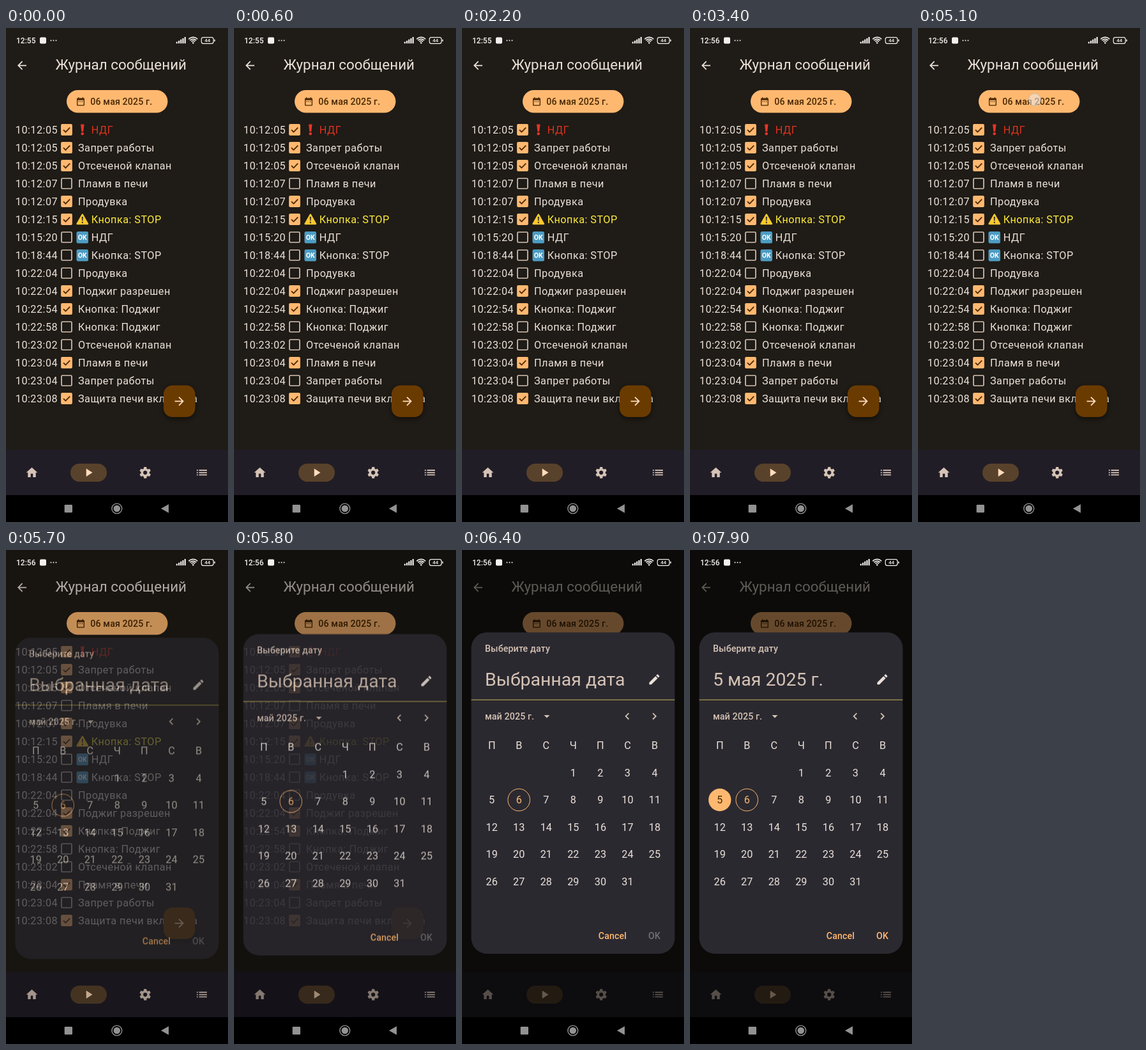
An HTML page with a canvas for the animation above (8 s loop, 348x772 px).

```html
<!DOCTYPE html>
<html lang="ru">
<head>
<meta charset="utf-8">
<title>Журнал сообщений</title>
<style>
html, body { margin: 0; width: 100%; height: 100%; overflow: hidden; background: #1f1b16; }
canvas { display: block; width: 348px; height: 772px; }
</style>
</head>
<body>
<canvas id="stage"></canvas>
<script>
const W = 348, H = 772, LOOP = 8000;
const BG = '#1f1b16', TEXT = '#ebe1d9', SOFT = '#d5c3b5', ACCENT = '#ffb870', DARK = '#4a2800';
const dpr = window.devicePixelRatio || 1;

function prepare(canvas) {
  canvas.width = W * dpr;
  canvas.height = H * dpr;
  const c = canvas.getContext('2d');
  c.scale(dpr, dpr);
  return c;
}
const screen2d = prepare(document.getElementById('stage'));
const sheet2d = prepare(document.createElement('canvas'));
let ctx = screen2d; // current drawing layer

const ICONS = {
  home: 'M10 20v-6h4v6h5v-8h3L12 3 2 12h3v8z',
  play: 'M8 5v14l11-7z',
  list: 'M3 13h2v-2H3zm0 4h2v-2H3zm0-8h2V7H3zm4 4h14v-2H7zm0 4h14v-2H7zM7 7v2h14V7z',
  back: 'M20 11H7.83l5.59-5.59L12 4l-8 8 8 8 1.41-1.41L7.83 13H20z',
  next: 'M12 4l-1.41 1.41L16.17 11H4v2h12.17l-5.58 5.59L12 20l8-8z',
  date: 'M9 11H7v2h2zm4 0h-2v2h2zm4 0h-2v2h2zm2-7h-1V2h-2v2H8V2H6v2H5c-1.1 0-2 .9-2 2v14c0 1.1.9 2 2 2h14c1.1 0 2-.9 2-2V6c0-1.1-.9-2-2-2zm0 16H5V9h14z',
  edit: 'M3 17.25V21h3.75L17.81 9.94l-3.75-3.75zM20.71 7.04c.39-.39.39-1.02 0-1.41l-2.34-2.34c-.39-.39-1.02-.39-1.41 0l-1.83 1.83 3.75 3.75z',
  left: 'M15.41 7.41L14 6l-6 6 6 6 1.41-1.41L10.83 12z',
  right: 'M10 6L8.59 7.41 13.17 12l-4.58 4.59L10 18l6-6z',
  drop: 'M7 10l5 5 5-5z'
};
for (const k in ICONS) ICONS[k] = new Path2D(ICONS[k]);

// time, checked, text, kind
const LOG = [
  ['10:12:05', 1, 'НДГ', 'alarm'],
  ['10:12:05', 1, 'Запрет работы'],
  ['10:12:05', 1, 'Отсеченой клапан'],
  ['10:12:07', 0, 'Пламя в печи'],
  ['10:12:07', 1, 'Продувка'],
  ['10:12:15', 1, 'Кнопка: STOP', 'warn'],
  ['10:15:20', 0, 'НДГ', 'ok'],
  ['10:18:44', 0, 'Кнопка: STOP', 'ok'],
  ['10:22:04', 0, 'Продувка'],
  ['10:22:04', 1, 'Поджиг разрешен'],
  ['10:22:54', 1, 'Кнопка: Поджиг'],
  ['10:22:58', 0, 'Кнопка: Поджиг'],
  ['10:23:02', 0, 'Отсеченой клапан'],
  ['10:23:04', 1, 'Пламя в печи'],
  ['10:23:04', 0, 'Запрет работы'],
  ['10:23:08', 1, 'Защита печи включена']
];
const KIND_COLOR = { alarm: '#e0321f', warn: '#fdec3c' };

const clamp = v => Math.max(0, Math.min(1, v));
const ramp = (t, a, b) => clamp((t - a) / (b - a));

function label(s, x, y, size, color, { weight = 400, gap = 0, align = 'left' } = {}) {
  ctx.font = `${weight} ${size}px Roboto, sans-serif`;
  ctx.letterSpacing = gap + 'px';
  ctx.textAlign = align;
  ctx.fillStyle = color;
  ctx.fillText(s, x, y);
}
function box(x, y, w, h, r, color) {
  ctx.beginPath();
  ctx.roundRect(x, y, w, h, r);
  ctx.fillStyle = color;
  ctx.fill();
}
function disc(x, y, r, color) {
  ctx.beginPath();
  ctx.arc(x, y, r, 0, 7);
  ctx.fillStyle = color;
  ctx.fill();
}
function ring(x, y, r, width, color) {
  ctx.beginPath();
  ctx.arc(x, y, r, 0, 7);
  ctx.lineWidth = width;
  ctx.strokeStyle = color;
  ctx.stroke();
}
function poly(points, color) {
  ctx.beginPath();
  points.forEach(p => ctx.lineTo(p[0], p[1]));
  ctx.closePath();
  ctx.fillStyle = color;
  ctx.fill();
}
function icon(name, x, y, color, size = 21.3) {
  ctx.save();
  ctx.translate(x, y);
  ctx.scale(size / 24, size / 24);
  ctx.translate(-12, -12);
  ctx.fillStyle = color;
  ctx.fill(ICONS[name], 'evenodd');
  ctx.restore();
}
function gear(x, y, color, hole) {
  ctx.save();
  ctx.translate(x, y);
  for (let i = 0; i < 6; i++) {
    poly([[-2.7, -5], [-1.9, -8.9], [1.9, -8.9], [2.7, -5]], color);
    ctx.rotate(Math.PI / 3);
  }
  disc(0, 0, 6.6, color);
  disc(0, 0, 3.1, hole);
  ctx.restore();
}

function checkbox(y, on) {
  if (!on) {
    ctx.beginPath();
    ctx.roundRect(87, y - 8, 16, 16, 1.5);
    ctx.lineWidth = 1.7;
    ctx.strokeStyle = SOFT;
    ctx.stroke();
    return;
  }
  box(86.1, y - 8.9, 17.8, 17.8, 2, ACCENT);
  ctx.beginPath();
  ctx.moveTo(90, y + .2);
  ctx.lineTo(93.4, y + 3.6);
  ctx.lineTo(100.2, y - 3.4);
  ctx.lineWidth = 1.8;
  ctx.strokeStyle = DARK;
  ctx.stroke();
}
function sign(kind, y) {
  if (kind === 'alarm') {
    poly([[117, y - 8.5], [122.6, y - 8.5], [121.2, y + 3], [118.4, y + 3]], '#e53427');
    disc(119.8, y + 6.2, 2.3, '#e53427');
  } else if (kind === 'warn') {
    ctx.lineJoin = 'round';
    poly([[119.8, y - 7.3], [128, y + 7], [111.6, y + 7]], '#fcc92d');
    ctx.lineWidth = 2.5;
    ctx.strokeStyle = '#fcc92d';
    ctx.stroke();
    poly([[118.6, y - 4], [121, y - 4], [120.5, y + 2.6], [119.1, y + 2.6]], '#40362c');
    disc(119.8, y + 5, 1.2, '#40362c');
  } else {
    box(110.5, y - 9, 18.5, 18.5, 2.5, '#4d9cc4');
    label('OK', 119.8, y + 4.1, 10.5, '#fff', { weight: 700, align: 'center' });
  }
}

function chip(t) {
  box(95, 97, 158.5, 35.5, 17.75, ACCENT);
  const fade = 1 - ramp(t, 5330, 5500);
  if (t > 5100 && fade > 0) {
    ctx.save();
    ctx.clip();
    disc(183, 112, 12 + 85 * ramp(t, 5100, 5330), `rgba(74,40,0,${.11 * fade})`);
    ctx.restore();
  }
  icon('date', 117, 114.8, DARK, 16);
  label('06 мая 2025 г.', 132.3, 119.8, 14.25, DARK, { weight: 500, gap: .1 });
}

function page(t) {
  ctx.fillStyle = BG;
  ctx.fillRect(0, 0, W, H);
  icon('back', 25, 58.5, TEXT, 21);
  label('Журнал сообщений', 77.5, 65.3, 22.4, TEXT);
  chip(t);
  LOG.forEach(([time, on, text, kind], i) => {
    const y = 159 + 28 * i;
    label(time, 14.8, y + 5.7, 16.3, TEXT, { gap: .44 });
    checkbox(y, on);
    if (kind) sign(kind, y);
    label(text, kind ? 133.8 : 113, y + 5.7, 16.3, KIND_COLOR[kind] || TEXT, { gap: .44 });
  });

  ctx.save();
  ctx.shadowColor = 'rgba(0,0,0,.45)';
  ctx.shadowBlur = 7 * dpr;
  ctx.shadowOffsetY = 3 * dpr;
  box(247, 558.5, 49.5, 49.5, 14, '#6a3b00');
  ctx.restore();
  icon('next', 271.7, 583.3, '#ffdcbe');

  const nav = '#211d26';
  ctx.fillStyle = nav;
  ctx.fillRect(0, 659, W, 71);
  box(101, 680.7, 57, 28.4, 14.2, '#59422b');
  icon('home', 40.5, 694.8, SOFT);
  icon('play', 129.3, 694.8, '#ffddbc');
  gear(218.2, 694.8, SOFT, nav);
  icon('list', 307, 694.8, SOFT);
}

function calendar(t) {
  const picked = t >= 7100;
  const fill = ramp(t, 7080, 7300);
  const press = ramp(t, 6900, 7050) * (1 - ramp(t, 7200, 7400));
  const colX = i => 46.7 + 42.55 * i;
  const cell = (s, x, y, color) => label(s, x, y + 5.8, 16.3, color, { align: 'center' });
  const bold = { weight: 500, gap: .1 };

  box(14.5, 128.7, 319, 502.3, 24.8, '#2b2930');
  label('Выберите дату', 36, 158.6, 14.25, SOFT, bold);
  label(picked ? '5 мая 2025 г.' : 'Выбранная дата', 36, 212, 28.5, SOFT);
  icon('edit', 301.5, 202.3, TEXT);
  ctx.fillStyle = '#b5a853';
  ctx.fillRect(14.5, 233.6, 319, 1.1);

  label('май 2025 г.', 36, 264.8, 14.25, SOFT, bold);
  icon('drop', 133, 259.8, SOFT);
  icon('left', 259, 259.8, SOFT);
  icon('right', 301.6, 259.8, SOFT);
  [...'ПВСЧПСВ'].forEach((d, i) => cell(d, colX(i), 305.6, TEXT));

  for (let d = 1; d <= 31; d++) {
    const n = d + 2, x = colX(n % 7), y = 348 + 42.5 * Math.floor(n / 7);
    let color = TEXT;
    if (d === 6) {
      color = ACCENT;
      ring(x, y, 17.3, 1, ACCENT);
    } else if (d === 5) {
      if (fill > .5) color = DARK;
      ctx.globalAlpha = fill;
      disc(x, y, 17.7, ACCENT);
      ctx.globalAlpha = 1;
      disc(x, y, 21 * ramp(t, 6860, 7050), `rgba(235,225,217,${.1 * press})`);
    }
    cell(d, x, y, color);
  }
  label('Cancel', 213.8, 608, 14.25, ACCENT, bold);
  label('OK', 292, 608, 14.25, picked ? ACCENT : 'rgba(235,225,217,.38)', bold);
}

function dialog(t) {
  if (t < 5600) return;
  const ease = (from, span) => t > 6250 ? 1 : 1 - Math.exp((from - t) / span);
  ctx.fillStyle = `rgba(0,0,0,${.6 * ease(5600, 200)})`;
  ctx.fillRect(0, 0, W, 730);

  // drawn on its own layer so that it fades as a whole
  ctx = sheet2d;
  ctx.clearRect(0, 0, W, H);
  calendar(t);
  ctx = screen2d;
  ctx.globalAlpha = ease(5590, 120);
  const drop = t > 6250 ? 0 : 8.3 * Math.exp((5700 - t) / 85);
  ctx.drawImage(sheet2d.canvas, 0, drop, W, H);
  ctx.globalAlpha = 1;
}

function systemBars(t) {
  const white = '#f2f0ee';
  label(t < 3400 ? '12:55' : '12:56', 16, 24, 12, white, { weight: 500 });
  box(53, 14.5, 10, 10, 2, white);
  for (let i = 0; i < 3; i++) disc(70.5 + 4 * i, 19.6, 1, white);

  for (let i = 0; i < 5; i++) {
    const h = 2.6 + 1.9 * i;
    box(266.8 + 3.2 * i, 24.2 - h, 2.2, h, .6, white);
  }
  ctx.lineWidth = 1.7;
  ctx.strokeStyle = white;
  for (const r of [3.8, 6.7, 9.6]) {
    ctx.beginPath();
    ctx.arc(293.3, 24, r, -Math.PI * .76, -Math.PI * .24);
    ctx.stroke();
  }
  disc(293.3, 23.2, 1.3, white);
  ctx.beginPath();
  ctx.roundRect(306.3, 14.7, 18.9, 9.6, 3);
  ctx.lineWidth = 1.2;
  ctx.stroke();
  box(326.3, 17.7, 1.5, 3.6, .7, white);
  label('44', 315.8, 22.4, 8, white, { weight: 500, align: 'center' });

  ctx.fillStyle = '#000';
  ctx.fillRect(0, 730, W, 42);
  const grey = '#929292';
  box(91.7, 745, 12.3, 12.3, 1.2, grey);
  ring(173.8, 751, 7.9, 1.4, grey);
  disc(173.8, 751, 5.3, grey);
  poly([[243, 751], [255, 744.2], [255, 757.8]], grey);
}

function touch(t, x, y, from, to) {
  if (t < from || t >= to) return;
  disc(x, y, 10, 'rgba(235,230,225,.6)');
  ring(x, y, 9.6, .8, 'rgba(150,140,130,.5)');
}

let start;
function frame(now) {
  start ??= now;
  const t = (now - start) % LOOP;
  page(t);
  dialog(t);
  systemBars(t);
  touch(t, 183, 112, 5080, 5200);
  touch(t, 45, 391, 6880, 7080);
  requestAnimationFrame(frame);
}
requestAnimationFrame(frame);
</script>
</body>
</html>
```
